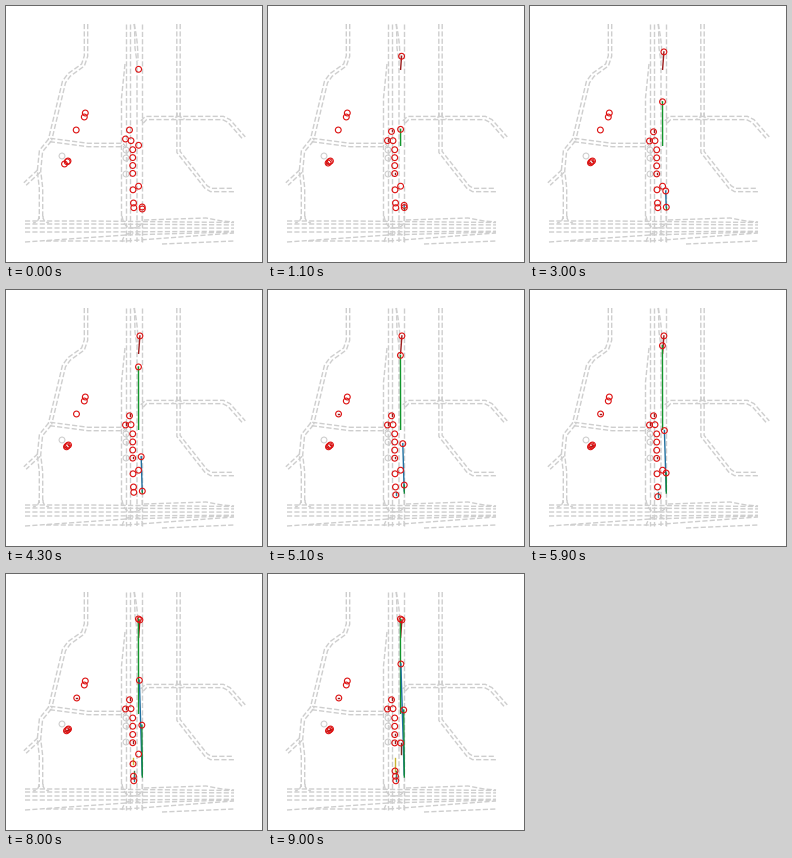
Animation of 256 by 256 pixels, one loop 9.1 s. Source, as a matplotlib script:

```python
import numpy as np
import matplotlib.pyplot as plt
from matplotlib.animation import FuncAnimation
from matplotlib.patches import Circle

SIZE, DPI = 256, 100
FRAMES, STEP = 91, 100
TOP, BOTTOM, LEFT, RIGHT = 18, 236, 19, 228
GRAY, RED, TRAIL = "#cecece", "#dd1111", "#9c1c1c"

fig = plt.figure(figsize=(SIZE / DPI, SIZE / DPI), dpi=DPI, facecolor="white")
ax = fig.add_axes([0, 0, 1, 1])
ax.set_xlim(0, SIZE)
ax.set_ylim(SIZE, 0)
ax.axis("off")


def line(*pts):
    x, y = np.array(pts, float).T
    ax.plot(x, y, "--", color=GRAY, lw=1, zorder=1)


def road(*pts, half=1.7):
    """Two dashed edges on either side of a centre line."""
    p = np.array(pts, float)
    d = np.diff(p, axis=0)
    d /= np.hypot(*d.T)[:, None]
    t = np.vstack([d[:1], d[:-1] + d[1:], d[-1:]])
    t /= np.hypot(*t.T)[:, None]
    normal = np.column_stack([-t[:, 1], t[:, 0]]) * half
    line(*(p + normal))
    line(*(p - normal))


def turn(a, b, c):
    """Quadratic curve through a junction."""
    s = np.linspace(0, 1, 12)[:, None]
    a, b, c = map(np.array, (a, b, c))
    line(*((1 - s) ** 2 * a + 2 * s * (1 - s) * b + s ** 2 * c))


def ring(x, y, color, zorder):
    return ax.add_patch(Circle((x, y), 2.9, fill=False, ec=color, lw=0.8, zorder=zorder))


def draw_map():
    # side streets
    corner = (44, 134)
    road((80, TOP), (80, 50), (77, 59), (63, 69), (58, 76), corner)
    road(corner, (82, 139), (118, 139))
    road(corner, (35, 145), (33, 165), (35, 182), (35, 213))
    road((33, 165), (LEFT, 178))
    road((172.5, TOP), (172.5, 146), (200, 181), (205, 184), (RIGHT, 184))
    road((136, 116), (140, 112), (217, 112), (223, 115), (238, 132))
    for side in (-1, 1):
        turn((172.5 + 1.5 * side, 107), (172.5 + side, 112), (172.5 + 6 * side, 113))
        turn((35 + 2 * side, 210), (35 + 2 * side, 216), (35 + 8 * side, 217))

    # avenue
    for x in (119.5, 124, 135.5):
        line((x, TOP), (x, BOTTOM))
    line((128.5, TOP), (129, 42), (131, 56), (131, BOTTOM))
    line((119, 58), (115.5, 92), (115.5, 215))
    turn((128, TOP), (132, 34), (132, 55))
    turn((117, 138), (121, 139), (121, 156))

    # cross road
    for y in (215, 218, 222, 226):
        line((LEFT, y), (85, y), (RIGHT, 0.8 * y + 44.5))
    line((138, 214), (200, 212), (216, 215), (RIGHT, 216))
    line((LEFT, BOTTOM), (120, 229), (RIGHT, 226))
    line((40, 235), (120, 235), (RIGHT, 227))
    line((156, 238), (RIGHT, 235))
    for x in (116, 136):
        for y, mid in ((210, 222), (BOTTOM, 227)):
            turn((x, y), (x + 2, mid), (126, mid))


clock = np.arange(FRAMES) * STEP / 1000
END = clock[-1]


def drive(t0, t1, up=0.0, down=0.0):
    """Share of the way covered: speed up, cruise, brake."""
    u = np.clip(clock, t0, t1) - t0
    span = t1 - t0
    covered = u - np.minimum(u, up) * (1 - np.minimum(u, up) / (2 * up)) if up else u
    if down:
        late = np.maximum(u - (span - down), 0)
        covered = covered - late ** 2 / (2 * down)
    return covered / (span - (up + down) / 2)


agents = []


def agent(x, y, *legs, color=TRAIL):
    """Each leg is (dx, dy, share of the way over time)."""
    xs, ys = np.full(FRAMES, float(x)), np.full(FRAMES, float(y))
    for dx, dy, share in legs:
        xs += dx * share
        ys += dy * share
    trail, = ax.plot([], [], color=color, lw=1, zorder=2)
    agents.append((xs, ys, trail, ring(x, y, RED, 4)))


draw_map()
ring(56, 150, GRAY, 3)
for y in (144, 152, 168):
    ring(120, y, GRAY, 1)

creep = drive(0.2, END)
settle = drive(0, 2, 0, 2)

# parked cars and people on the left
agent(79.3, 107)
agent(78.3, 111)
agent(70.2, 124, (0.6, 0, creep))
agent(62, 155, (0.5, 0, settle))
agent(61.2, 155.8, (0.5, 0, creep))
agent(58.5, 158, (2, -1.2, settle))

# queue on the avenue
agent(123.5, 124, (0, 1.8, settle))
agent(119.5, 133, (0, 2, settle))
agent(125, 134.7)
for k in range(4):
    agent(126.7, 143.7 + 7.9 * k, (0, 0.3 + 0.4 * k, creep))
agent(127, 183.8, (0, 13.2, drive(5.9, END, 3.1)), color="#c8b432")
agent(127.5, 197, (0, 5.2, drive(5.9, 8)), color="#4a7a4a")
agent(127.8, 201.7, (0, 5.1, drive(4.1, 6.2, 0, 1)), color="#2f7f8f")

# through traffic
agent(132.6, 180.2, (0, -11.2, drive(7.9, END, 1.1)), color="#7a2a20")
agent(132.6, 63.3, (1.3, -17.4, drive(0, 2.2, 0, 2.2)))
agent(132.6, 139.3, (-0.2, -94.3, drive(0, 8, 0, 3)), color="#12962c")
agent(136.2, 201, (-3.3, -111, drive(0.2, END, 4)), color="#1f6f9f")
agent(136.3, 203, (0, -1.8, settle), (-0.6, -65.2, drive(4.2, END, 1)), color="#128a3a")


def update(i):
    for xs, ys, trail, mark in agents:
        trail.set_data(xs[:i + 1], ys[:i + 1])
        mark.center = xs[i], ys[i]
    return [part for *_, trail, mark in agents for part in (trail, mark)]


anim = FuncAnimation(fig, update, frames=FRAMES, interval=STEP, repeat=True, repeat_delay=0)
plt.show()
```
